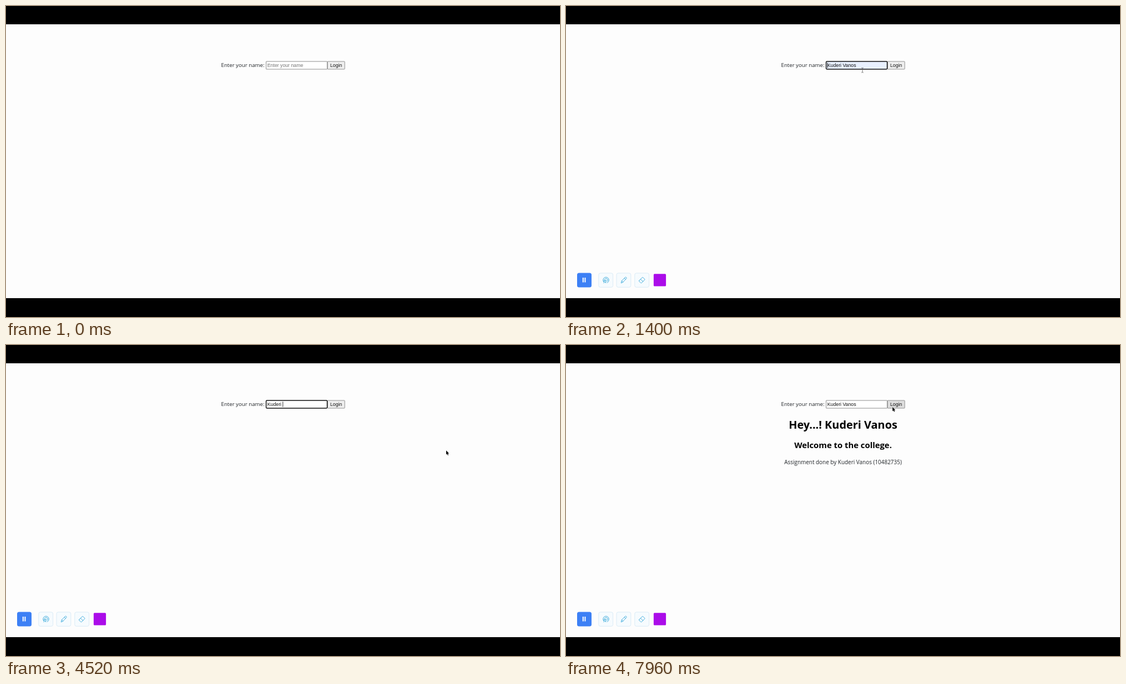
An HTML page for the animation above (8000 ms loop, 998x561 px).

```html
<!DOCTYPE html>
<html lang="en">
<head>
<meta charset="utf-8">
<title>Login form</title>
<style>
  html, body { margin: 0; width: 100%; height: 100%; overflow: hidden; background: #000; }
  svg { display: block; width: 100%; height: 100%; }
  text { white-space: pre; }
  .page { font-family: "Open Sans", "Noto Sans", sans-serif; font-size: 9.68px; fill: #212529; }
  .centred { text-anchor: middle; }
  .heading { font-weight: 700; fill: #000; }
  .control { font-family: "Liberation Sans", Arial, sans-serif; font-size: 8.72px; fill: #111; }
  .tool { fill: #f6fbfe; stroke: #d3e8f4; stroke-width: .8; }
  .icon { fill: none; stroke: #35a7da; stroke-width: .9; stroke-linecap: round; stroke-linejoin: round; }
</style>
</head>
<body>
<svg viewBox="0 0 998 561">
  <clipPath id="screen"><rect y="33" width="998" height="494"/></clipPath>
  <rect width="998" height="561"/>
  <g clip-path="url(#screen)">
    <rect y="33" width="998" height="494" fill="#fdfdfd"/>

    <text class="page" x="387.5" y="109.7">Enter your name:</text>
    <rect id="button" x="579.2" y="100" width="31" height="14" rx=".8" stroke="#858585" stroke-width=".9"/>
    <text class="control" x="584" y="110">Login</text>
    <rect id="field" x="468.6" y="100" width="110" height="14"/>
    <text id="value" class="control" x="470.8" y="110"></text>
    <rect id="caret" y="102.2" width=".8" height="9.6"/>

    <g id="welcome" class="page centred">
      <text class="heading" x="499" y="150.6" font-size="19.9" id="greeting"></text>
      <text class="heading" x="499" y="186.2" font-size="14.85">Welcome to the college.</text>
      <text x="499" y="214.6" font-size="9.95" id="credit"></text>
    </g>

    <g id="toolbar">
      <rect x="20" y="481.5" width="26" height="26" rx="3.5" fill="#3d80f5"/>
      <path d="M30.8 490v8.6M34.4 490v8.6" stroke="#fff" stroke-width="2"/>
      <rect class="tool" x="58.8" y="481.9" width="25.8" height="25.4" rx="3"/>
      <rect class="tool" x="91" y="481.9" width="25.8" height="25.4" rx="3"/>
      <rect class="tool" x="123.8" y="481.9" width="25.8" height="25.4" rx="3"/>
      <g class="icon">
        <path d="M67.6 497.4A5.3 5.3 0 1 1 74.2 499.3M69.3 495.6A3.1 3.1 0 1 1 74 496.9"/>
        <path d="M72 494.4L67.2 496.4 69.3 497.2 68.2 499.8M72 494.4L71.6 499.6 70.4 497.7"/>
        <path d="M99.4 499.4L100.4 495.8 106.6 489.4Q107.6 488.6 108.6 489.6T108.8 491.6L102.6 498.2ZM105.2 490.9L107.4 493M100.4 495.8L102.6 498.2"/>
        <path d="M131.9 495.1L137.3 489.8Q138.1 489.1 138.9 489.8L141.6 492.5Q142.3 493.3 141.6 494.1L136.2 499.4Q135.4 500 134.6 499.4L131.9 496.7Q131.2 495.9 131.9 495.1ZM134.3 492.8L138.7 496.9"/>
      </g>
      <rect x="157.9" y="483.3" width="22.2" height="22.2" rx="1.6" fill="#ab0ce9"/>
    </g>

    <g id="pointer">
      <path id="arrow" d="M0 0V7.4L1.7 5.9 2.9 8.6 4.1 8.1 2.9 5.4H5.2Z" stroke="#fff" stroke-width=".7" paint-order="stroke"/>
      <path id="beam" d="M-1.8 -4.3Q0 -4.3 0 -3.5 0 -4.3 1.8 -4.3M0 -3.5V3.5M-1.8 4.3Q0 4.3 0 3.5 0 4.3 1.8 4.3" fill="none" stroke="#555" stroke-width=".8"/>
    </g>
  </g>
</svg>
<script>
const LOOP = 8000;
const NAME = "Kuderi Vanos";
const SHOWN = 120, FOCUS = 960, PREVIEW = 1160, PREVIEW_END = 1500;
const TYPING = 3040, KEY_GAP = 215, CLICK = 7240;

// Pointer stops: time, x, y
const stops = [
  [SHOWN, 575, 163], [280, 568.4, 154], [800, 536, 105], [1000, 535, 106],
  [1240, 534, 115.8], [1440, 534, 115.8], [1680, 793, 190.3], [5680, 793, 190.3],
  [6000, 711, 29.2], [6120, 704, 33], [6640, 601, 105], [7000, 594, 108],
  [7300, 592, 109], [7600, 588.2, 112]
];

const el = id => document.getElementById(id);
const show = (id, on) => el(id).style.display = on ? "" : "none";
const set = (id, attrs) => {
  for (const [key, val] of Object.entries(attrs)) el(id).setAttribute(key, val);
};

el("greeting").textContent = `Hey...! ${NAME}`;
el("credit").textContent = `Assignment done by ${NAME} (10482735)`;

function pointerAt(t) {
  const next = stops.findIndex(stop => stop[0] > t);
  if (next === 0) return stops[0].slice(1);
  if (next < 0) return stops.at(-1).slice(1);
  const [t0, x0, y0] = stops[next - 1], [t1, x1, y1] = stops[next];
  const p = (t - t0) / (t1 - t0), k = p * p * (3 - 2 * p);
  return [x0 + (x1 - x0) * k, y0 + (y1 - y0) * k];
}

function drawField(t) {
  const focused = t >= FOCUS && t < CLICK;
  const preview = t >= PREVIEW && t < PREVIEW_END;
  const count = Math.max(0, Math.min(NAME.length, Math.floor((t - TYPING) / KEY_GAP) + 1));
  const typed = NAME.slice(0, count);
  const value = el("value");

  set("field", {
    fill: preview ? "#e8f0fe" : "#fff",
    stroke: focused ? "#101010" : "#808080",
    "stroke-width": focused ? 1.5 : 0.9,
    rx: focused ? 1.4 : 0.4
  });
  value.textContent = typed;
  const caretX = 470.8 + (typed ? value.getComputedTextLength() : 0);
  value.textContent = preview ? NAME : typed || "Enter your name";
  value.style.fill = preview || typed ? "#111" : "#757575";

  // The blink restarts with every key
  const lastKey = count ? TYPING + (count - 1) * KEY_GAP : FOCUS;
  show("caret", focused && (t - lastKey) % 1000 < 500);
  set("caret", { x: caretX });
}

function drawPointer(t) {
  const [x, y] = pointerAt(t);
  const overField = x > 468 && x < 579 && y > 99 && y < 120;
  const overButton = x >= 579 && x < 611 && y > 99 && y < 114.5;
  show("pointer", t >= SHOWN);
  show("beam", overField);
  show("arrow", !overField);
  set("pointer", { transform: `translate(${x} ${y})` });
  set("button", { fill: overButton ? "#dedede" : "#efefef" });
}

function draw(now) {
  const t = now % LOOP;
  drawField(t);
  drawPointer(t);
  show("toolbar", t >= SHOWN);
  show("welcome", t >= CLICK);
}

const start = performance.now();
function tick() {
  draw(performance.now() - start);
  requestAnimationFrame(tick);
}
tick();
</script>
</body>
</html>
```
